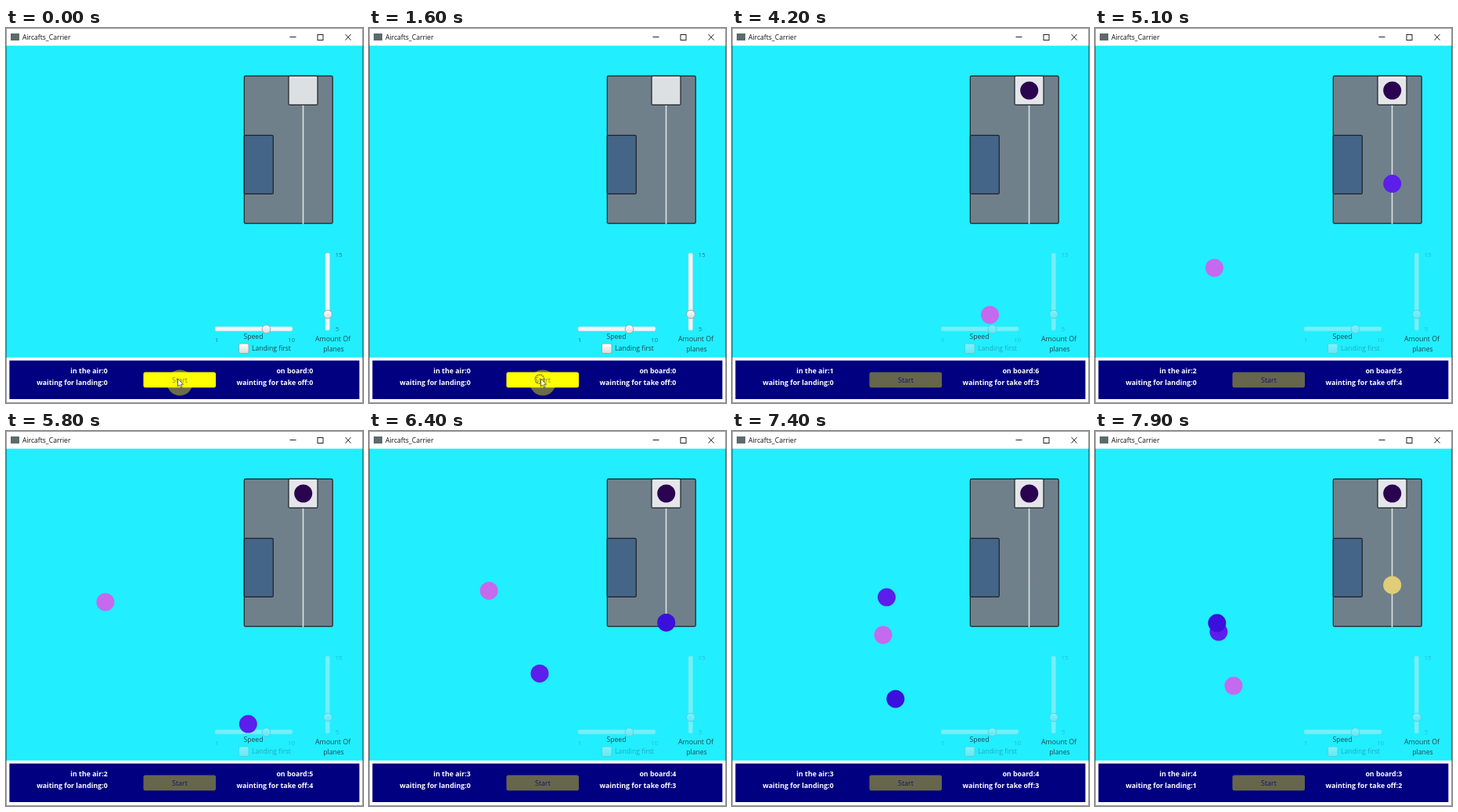
An HTML page that plays this animation: 456 by 480 pixels, repeating every 8000 ms.

```html
<!DOCTYPE html>
<html lang="en">
<head>
<meta charset="utf-8">
<title>Aircafts_Carrier</title>
<style>
  html, body { margin: 0; width: 100%; height: 100%; overflow: hidden; background: #fff; }
  svg { display: block; width: 456px; height: 480px; }
  text { font: 8.6px "Open Sans", "Noto Sans", sans-serif; fill: #24464c; }
  .mid { text-anchor: middle; }
  .axis { font-size: 8px; fill: #1c7f88; }
  .stat { font-size: 8.8px; font-weight: 700; fill: #fff; text-anchor: end; }
  .box { stroke: #1d2226; stroke-width: 1.2; }
  .knob { fill: url(#knob); stroke: #8fa3a6; stroke-width: .9; }
  .track { fill: #f1f5f5; stroke: #b5d5d8; stroke-width: .6; }
</style>
</head>
<body>
<svg viewBox="0 0 456 480">
  <defs>
    <linearGradient id="knob" x2="0" y2="1">
      <stop stop-color="#fff"/><stop offset="1" stop-color="#d6dadb"/>
    </linearGradient>
  </defs>

  <rect width="456" height="480" fill="#fff"/>
  <rect y="22.6" width="456" height="399.2" fill="#21eeff"/>

  <!-- title bar -->
  <rect x="6" y="7" width="11" height="9" fill="#5c6b6b"/>
  <text x="21" y="15" style="fill:#111">Aircafts_Carrier</text>
  <g fill="none" stroke="#222">
    <path d="M362.5 11.5h8M433.5 8l7 7.5m0-7.5l-7 7.5"/>
    <rect x="398" y="8.5" width="7" height="7"/>
  </g>

  <!-- carrier -->
  <rect class="box" x="304.3" y="61.4" width="112.9" height="188.8" rx="1.5" fill="#70808a"/>
  <rect class="box" x="304.3" y="137.4" width="37" height="75" rx="1.5" fill="#446488"/>
  <path d="M379.5 98V251" stroke="#dde2e4" stroke-width="1.6"/>
  <rect class="box" id="pad" x="361" y="61.4" width="37" height="37" rx="1.5"/>

  <!-- controls -->
  <g id="controls">
    <rect class="track" x="267" y="382.3" width="99" height="5.6" rx="2"/>
    <circle class="knob" cx="332.5" cy="385.5" r="5.4"/>
    <text class="axis mid" x="269" y="402.4">1</text>
    <text class="axis mid" x="364.5" y="402.4">10</text>
    <rect class="track" x="408" y="288" width="5.6" height="99" rx="2"/>
    <circle class="knob" cx="411" cy="366.5" r="5.4"/>
    <text class="axis mid" x="425" y="293">15</text>
    <text class="axis mid" x="423" y="388">5</text>
    <rect class="knob" x="297.5" y="404" width="12.5" height="12.5" rx="2"/>
    <text x="314" y="412.8">Landing first</text>
  </g>
  <text class="mid" x="316" y="398.3">Speed</text>
  <text class="mid" x="417.5" y="400.5" style="font-size:8.8px">Amount Of</text>
  <text class="mid" x="418.5" y="414">planes</text>

  <!-- status panel -->
  <rect x="4.4" y="425.6" width="447" height="49.4" fill="#000080"/>
  <text class="stat" id="air" x="129.7" y="442.3"></text>
  <text class="stat" id="landing" x="129.7" y="457"></text>
  <text class="stat" id="board" x="392.2" y="442.3"></text>
  <text class="stat" id="takeoff" x="392.2" y="457"></text>
  <rect id="button" x="175.5" y="440.6" width="92.5" height="19.6" rx="2.5" fill="#ff0"/>
  <text class="mid" id="start" x="222" y="453.8" style="font-size:9px">Start</text>

  <g id="planes"></g>

  <g id="pointer">
    <circle r="16.5" cx="222" cy="454" fill="#ff0" fill-opacity=".42"/>
    <circle id="ripple" cx="218" cy="449.5" r="5.6" fill="none" stroke="#85835c" stroke-width="2" stroke-dasharray="1.8 .9"/>
    <path d="M219.5 449v10l2.3-2.2 1.7 3.7 1.6-.7-1.7-3.6h3.1z" fill="#fff" stroke="#222" stroke-width=".7"/>
  </g>
  <rect x=".5" y=".5" width="455" height="479" fill="none" stroke="#000" stroke-opacity=".4"/>
</svg>
<script>
const LOOP = 8000, CLICK = 1700, FLEET = 7;
const PAD = [379.7, 80], RADIUS = 11.5;
const SPEED = 0.31, STRAIGHT = 209, TURN = 100;
const TURN_END = (STRAIGHT + TURN * Math.PI / 2) / SPEED;

// take-off time, then the key points passed while circling
const flights = [
  { color: '#c569ee', start: 3187, keys: [{ t: 5800, x: 127, y: 219 }, { t: 7000, x: 196, y: 223 }, { t: 7900, x: 177, y: 326 }] },
  { color: '#5c1eea', start: 4716, keys: [{ t: 7000, x: 226, y: 204 }, { t: 7900, x: 158, y: 257 }] },
  { color: '#3b10dc', start: 5868, keys: [{ t: 7900, x: 156, y: 246 }] },
  { color: '#e1cd78', start: 7523, keys: [] }
];

const $ = id => document.getElementById(id);
const show = (el, on) => el.setAttribute('visibility', on ? 'visible' : 'hidden');

function addPlane(color) {
  const dot = document.createElementNS('http://www.w3.org/2000/svg', 'circle');
  dot.setAttribute('r', RADIUS);
  dot.setAttribute('fill', color);
  $('planes').append(dot);
  return dot;
}

function place(dot, [x, y]) {
  dot.setAttribute('cx', x);
  dot.setAttribute('cy', y);
}

// smooth curve through the key points, leaving the first one heading west
function glide(keys, t) {
  const last = keys.length - 1;
  let i = 0;
  while (i < last - 1 && t >= keys[i + 1].t) i++;
  const p = keys[i], q = keys[i + 1], span = q.t - p.t, u = (t - p.t) / span;
  const velocity = (k, axis) => {
    if (k === 0) return axis === 'x' ? -SPEED : 0;
    const a = keys[k - 1], b = keys[Math.min(k + 1, last)];
    return (b[axis] - a[axis]) / (b.t - a.t);
  };
  return ['x', 'y'].map(axis => p[axis] + (q[axis] - p[axis]) * u * u * (3 - 2 * u)
    + span * u * (1 - u) * ((1 - u) * velocity(i, axis) - u * velocity(i + 1, axis)));
}

// down the runway, a quarter turn, then the holding pattern
function position({ start, keys }, t) {
  const d = (t - start) * SPEED;
  if (d < STRAIGHT) return [PAD[0], PAD[1] + d];
  if (t - start < TURN_END) {
    const a = (d - STRAIGHT) / TURN;
    return [280 + 100 * Math.cos(a), 289 + 90 * Math.sin(a)];
  }
  return glide([{ t: start + TURN_END, x: 280, y: 379 }, ...keys], t);
}

for (const f of flights) f.dot = addPlane(f.color);
const parked = addPlane('#2b0450');
place(parked, PAD);

function drawCounts(air) {
  $('air').textContent = `in the air:${air}`;
  $('landing').textContent = `waiting for landing:${air > 3 ? 1 : 0}`;
  $('board').textContent = `on board:${air ? FLEET - air : 0}`;
  $('takeoff').textContent = `wainting for take off:${air ? 4 - Math.abs(air - 2) : 0}`;
}

function draw(t) {
  const running = t >= CLICK;
  for (const id of ['controls', 'button']) $(id).setAttribute('opacity', running ? 0.4 : 1);
  $('start').style.fill = running ? '#14146e' : '#333';
  $('pad').setAttribute('fill', running ? '#e4e6e9' : '#dce0e3');
  show(parked, running);

  for (const f of flights) {
    const flying = t >= f.start;
    show(f.dot, flying);
    if (flying) place(f.dot, position(f, t));
  }
  drawCounts(flights.filter(f => t >= f.start).length);

  const leave = Math.min(Math.max((t - 1900) / 400, 0), 1);
  $('pointer').setAttribute('transform', `translate(${leave * 14} ${leave * leave * 50})`);
  show($('pointer'), leave < 1);
  show($('ripple'), t >= 1500 && t < CLICK);
}

const begin = performance.now();
function tick() {
  draw((performance.now() - begin) % LOOP);
  requestAnimationFrame(tick);
}
tick();
</script>
</body>
</html>
```
